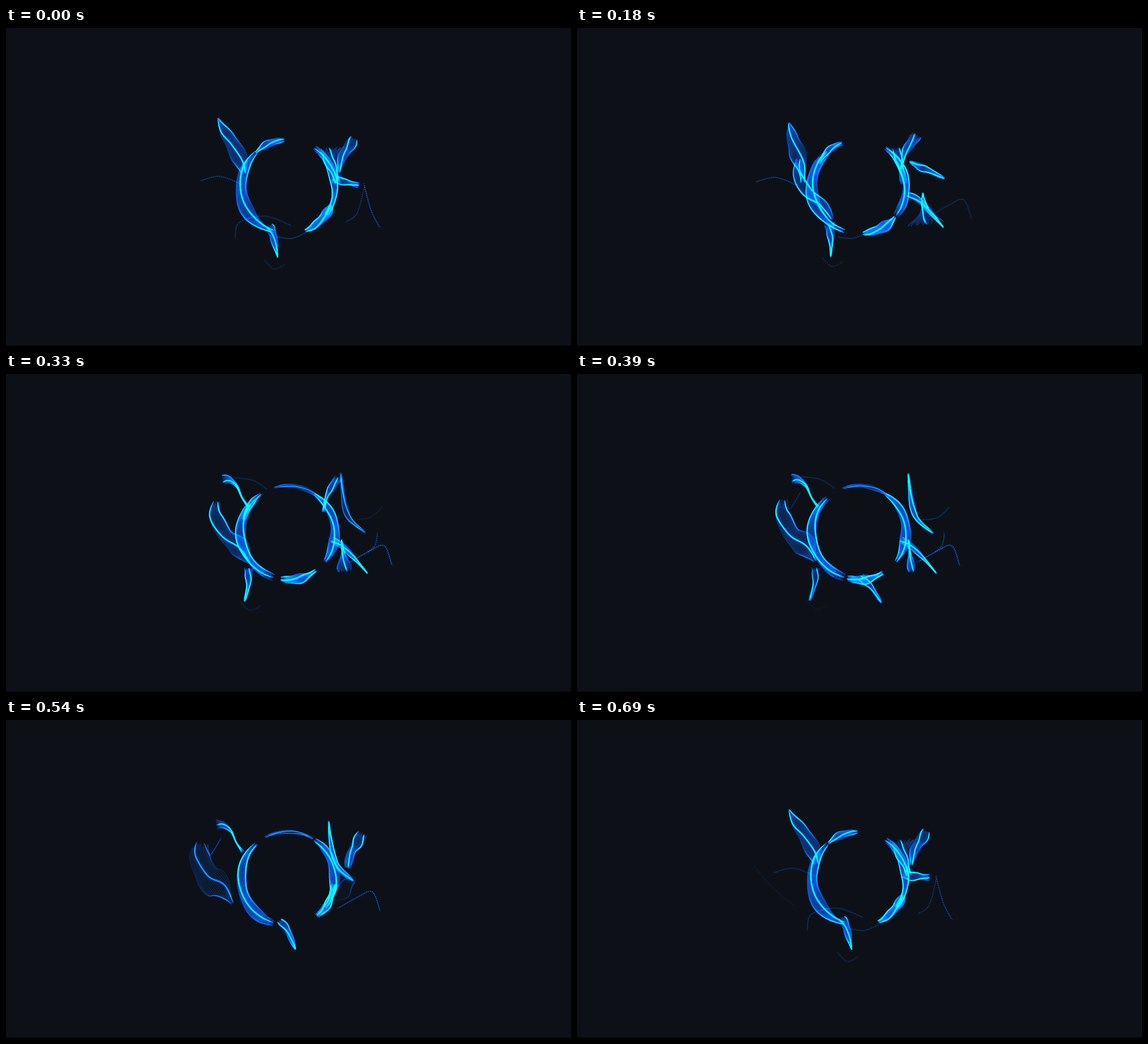
An HTML page with a canvas that plays this animation: 998 by 561 pixels, repeating every 0.72 s.

```html
<!DOCTYPE html>
<html lang="en">
<head>
<meta charset="utf-8">
<title>Blue veil</title>
<style>
  html, body { margin: 0; width: 100%; height: 100%; overflow: hidden; background: #0d1117; }
  canvas { display: block; }
</style>
</head>
<body>
<canvas id="stage" width="998" height="561"></canvas>
<script>
const ctx = document.getElementById('stage').getContext('2d');
const LOOP = 720, STEP = 30, FADE = 70;
const CENTER = [498, 280], RADIUS = 83;
const parts = [];

// A spine of [x, y, half width] as it stands at time `at`. It drifts (px/s), spins (rad/s)
// and grows (share/s) during its life, which may reach into the next loop.
const sheet = options => parts.push({
  at: 0, drift: [0, 0], spin: 0, grow: 0, strands: 30, glow: .8, ...options,
});
const thread = (at, life, drift, spine, glow = .8) =>
  sheet({ at, life, drift, spine, glow, strands: 2, dotted: true });

// Spine along the ring, in degrees, tapered at both ends
const arc = (from, to, width) => Array.from({ length: 9 }, (_, i) => {
  const a = (from + (to - from) * i / 8) * Math.PI / 180;
  return [CENTER[0] + RADIUS * Math.cos(a), CENTER[1] + RADIUS * Math.sin(a),
    width * (.4 + .6 * Math.sin(Math.PI * i / 8))];
});

// The ring: two standing sides, and stretches that slide along it
sheet({ spine: arc(228, 108, 10), glow: 1.1 });
sheet({ spine: arc(-56, 38, 8), glow: 1 });
sheet({ at: 840, life: [430, 1260], spine: arc(80, 34, 8), spin: 1.6, pivot: CENTER, glow: 1.4 });
sheet({ at: 720, life: [620, 1090], spine: arc(266, 226, 6), spin: -1.6, pivot: CENTER });
sheet({ at: 480, life: [200, 680], spine: arc(244, 306, 3), spin: -1, pivot: CENTER, strands: 9 });

// Left side
sheet({ at: 840, life: [540, 1050], drift: [-60, 70], spin: 1.2,
  spine: [[374, 164, 1], [382, 190, 10], [393, 214, 13], [403, 242, 10], [406, 268, 6]] });
sheet({ at: 390, life: [60, 580], drift: [-140, -40], grow: 1.4,
  spine: [[364, 222, 8], [362, 248, 15], [378, 282, 17], [402, 302, 15], [421, 330, 3]] });
sheet({ at: 430, life: [200, 590], drift: [-50, -10],
  spine: [[377, 186, 8], [389, 186, 6], [403, 197, 2], [412, 217, 1], [424, 235, 3]] });
sheet({ at: 720, life: [340, 1150], drift: [-135, -12], spin: 1.2,
  spine: [[464, 348, 8], [473, 370, 6], [480, 405, 1]] });

// Right side
sheet({ at: 720, life: [630, 980], drift: [-30, 0], grow: -2.2,
  spine: [[572, 211, 19], [574, 232, 13], [579, 255, 9], [583, 275, 6]] });
sheet({ at: 480, life: [300, 680], drift: [-100, 20],
  spine: [[576, 177, 1], [579, 205, 3], [585, 240, 5], [595, 262, 5], [620, 283, 1]] });
sheet({ at: 120, life: [40, 330], drift: [-50, 30], grow: -3,
  spine: [[590, 234, 2], [608, 242, 8], [624, 250, 9], [652, 264, 1]] });
sheet({ at: 600, life: [530, 800], drift: [30, -75], spin: 4, grow: -4.5,
  spine: [[573, 285, 22], [590, 287, 17], [607, 284, 12], [620, 280, 6]] });
sheet({ at: 720, life: [440, 1110], drift: [-85, -35], grow: -1,
  spine: [[615, 194, 10], [605, 210, 10], [594, 228, 6], [588, 255, 3]] });
sheet({ at: 840, life: [730, 1240], drift: [-120, 10], grow: -2.7,
  spine: [[618, 290, 1], [620, 312, 8], [624, 346, 27]] });
sheet({ at: 240, life: [80, 450], drift: [-60, 0],
  spine: [[580, 293, 5], [600, 304, 5], [622, 326, 3], [644, 352, 1]] });

// Loose threads
thread(840, [640, 1040], [-150, 10], [[325, 271], [360, 263], [400, 278]]);
thread(720, [640, 960], [-100, 0], [[478, 368], [505, 371], [532, 360]]);
thread(720, [570, 830], [-60, 0], [[405, 372], [412, 343], [458, 332], [505, 349]], .6);
thread(960, [620, 1130], [-130, -25], [[425, 403], [442, 419], [462, 411]], .35);
thread(720, [630, 800], [-60, 0], [[632, 274], [645, 322], [661, 353]], 1);
thread(720, [630, 800], [-60, 0], [[633, 280], [620, 327], [600, 342]], .6);
thread(390, [150, 600], [-100, 0], [[600, 333], [635, 313], [662, 303], [676, 338]], 1.2);
thread(390, [190, 530], [-120, 5], [[632, 314], [645, 302], [649, 280]]);
thread(390, [300, 540], [-120, 10], [[600, 257], [635, 254], [658, 235]], .6);
thread(480, [350, 660], [-100, 0], [[362, 220], [367, 238], [386, 208]], 1);
thread(600, [550, 700], [-60, 0], [[317, 256], [350, 295], [390, 328]], 1);
thread(390, [200, 460], [-110, -30], [[395, 181], [430, 186], [455, 202]], .5);

// The spine moved to its place at the given time
function place({ spine, at, drift, spin, grow, pivot }, time) {
  const s = (time - at) / 1000;
  const [px, py] = pivot || spine[spine.length >> 1];
  const c = Math.cos(spin * s), n = Math.sin(spin * s), size = Math.max(.25, 1 + grow * s);
  return spine.map(([x, y, w = .5]) => [
    px + (x - px) * c - (y - py) * n + drift[0] * s,
    py + (x - px) * n + (y - py) * c + drift[1] * s,
    w * size,
  ]);
}

// Catmull-Rom curve through the spine
function smooth(points) {
  const detail = 10, last = points.length - 1;
  const at = i => points[Math.max(0, Math.min(last, i))];
  return Array.from({ length: last * detail + 1 }, (_, j) => {
    const i = Math.min(last - 1, Math.floor(j / detail)), s = j / detail - i;
    return [0, 1, 2].map(k => {
      const [p, q, r, t] = [-1, 0, 1, 2].map(d => at(i + d)[k]);
      return q + s / 2 * (r - p + s * (2 * p - 5 * q + 4 * r - t + s * (3 * (q - r) + t - p)));
    });
  });
}

// Strands fold over each other across the sheet and glow where they crowd
function drawSheet(part, time, seed) {
  const [from, to] = part.life || [-Infinity, Infinity];
  const alpha = Math.min(1, (time - from) / FADE, (to - time) / FADE);
  if (alpha <= 0) return;
  const curve = smooth(place(part, time)), last = curve.length - 1;
  const phase = seed * 2.4 + time / LOOP * 2 * Math.PI;
  const rails = curve.map(([x, y, w], j) => {
    const a = curve[Math.max(0, j - 1)], b = curve[Math.min(last, j + 1)];
    const dx = b[0] - a[0], dy = b[1] - a[1];
    const scale = w * (1 + .2 * Math.sin(j / last * 11 + phase)) / (Math.hypot(dx, dy) || 1);
    return [x, y, -dy * scale, dx * scale];
  });
  ctx.setLineDash(part.dotted ? [2, 1.5] : []);
  ctx.strokeStyle = `rgba(0,${60 * part.glow},${165 * part.glow},${alpha * .8})`;
  for (let i = 0; i < part.strands; i++) {
    const v = 2 * i / (part.strands - 1) - 1;
    const first = Math.floor(i * .618 % 1 * last * .15);
    const end = last - Math.floor(i * .382 % 1 * last * .15);
    ctx.beginPath();
    for (let j = first; j <= end; j++) {
      const [x, y, nx, ny] = rails[j];
      const off = (v + .32 * Math.sin(4.5 * v + j / last * 6 + phase)) / 1.1;
      ctx.lineTo(x + nx * off, y + ny * off);
    }
    ctx.stroke();
  }
}

function draw(now) {
  const time = Math.floor(now % LOOP / STEP) * STEP;
  ctx.globalCompositeOperation = 'source-over';
  ctx.fillStyle = '#0d1117';
  ctx.fillRect(0, 0, 998, 561);
  ctx.fillStyle = '#000';
  ctx.fillRect(0, 560, 998, 1);
  ctx.globalCompositeOperation = 'lighter';
  ctx.lineWidth = 1.4;
  parts.forEach((part, seed) => {
    drawSheet(part, time, seed);
    if (part.life) drawSheet(part, time + LOOP, seed);
  });
}

const start = performance.now();
function tick() {
  draw(performance.now() - start);
  requestAnimationFrame(tick);
}
tick();
</script>
</body>
</html>
```
